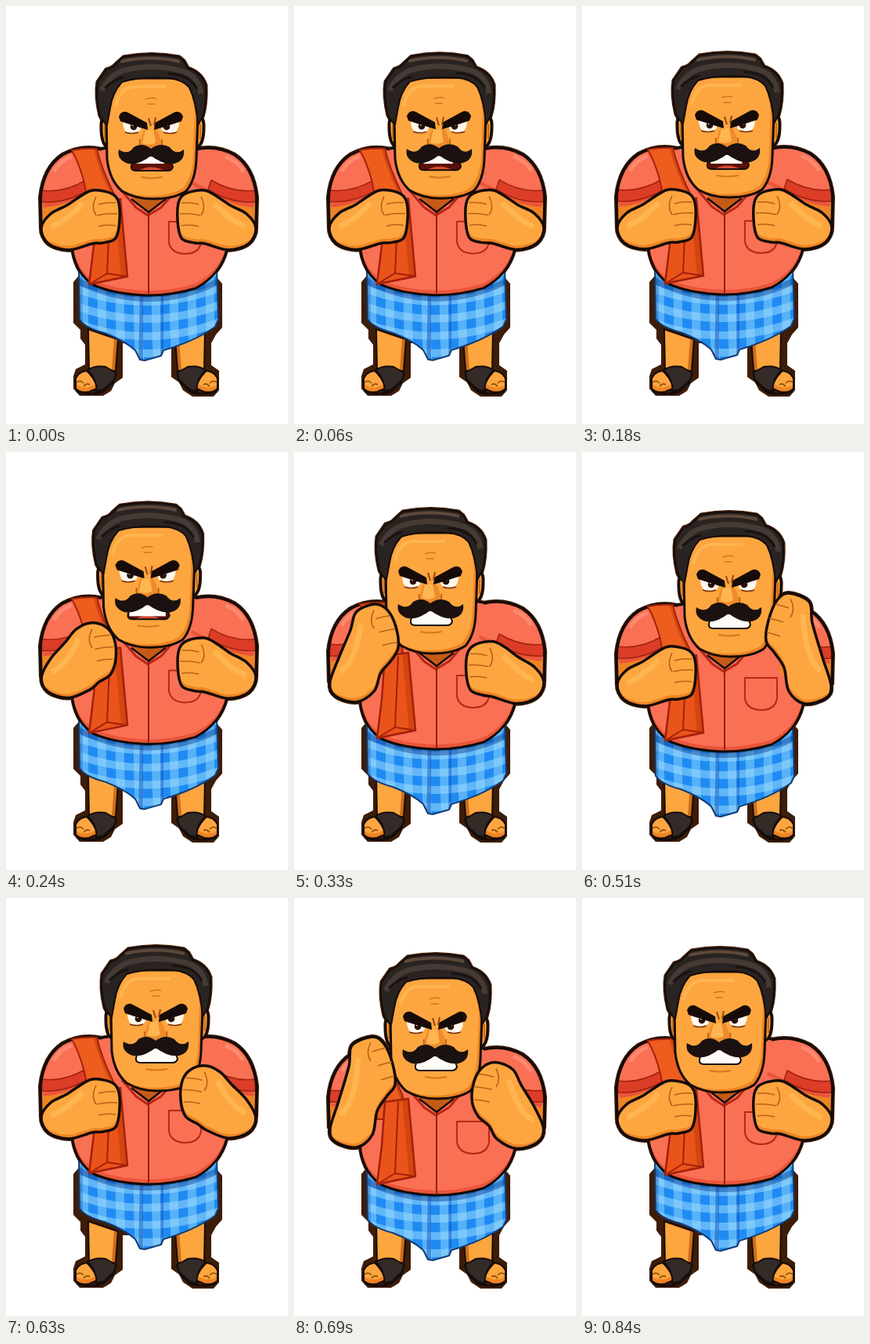
Write an HTML page with a canvas that moves like this. It is 360 by 533 pixels and loops after 900 ms.

```html
<!DOCTYPE html>
<html lang="en">
<head>
<meta charset="utf-8">
<title>Angry man</title>
<style>
html, body { margin: 0; width: 100%; height: 100%; overflow: hidden; background: #fff; }
canvas { display: block; width: 360px; height: 533px; }
</style>
</head>
<body>
<canvas id="stage" width="360" height="533"></canvas>
<script>
const ctx = document.getElementById('stage').getContext('2d');
const LOOP = 900;
const INK = '#160b08', BROWN = '#3d1d08';
const SKIN = '#fda63f', SKIN_DARK = '#ee8424', SKIN_LIGHT = '#ffb550';
const SHIRT = '#fa7054', SHIRT_DARK = '#ea5539', SHIRT_LIGHT = '#ff8a70', RED = '#b92716';

// Times at which the picture changes.
const STEPS = [0, 60, 120, 180, 240, 300, 330, 420, 480, 510, 570, 630, 690, 720, 780, 840];

// time, head x, head y, body y, left fist, right fist, open mouth
const KEYS = [
  [0, 0, 0, 0, 0, 0, 1],
  [180, 0, -2, -1, 0, 0, .8],
  [330, -11, 11, 10, .75, .05, 0],
  [510, 2, 15, 13, 0, 1, 0],
  [630, 6, 0, -4, 0, .25, 0],
  [690, -5, 10, 10, 1, .52, 0],
  [840, -10, 2, -2, 0, 0, 0],
  [900, 0, 0, 0, 0, 0, 1]
];

const P = d => new Path2D(d);
const lerp = (a, b, t) => a + (b - a) * t;

const torso = P('M118 183Q150 177 183 178Q215 177 248 183Q280 192 284 240L282 310Q274 343 242 360Q212 369 182 369Q140 368 112 356Q90 342 85 312L82 240Q85 192 118 183Z');
const sleeve = P('M122 183Q96 177 72 190Q48 206 44 244L48 257Q76 255 102 240L128 228Z');
const shoulder = P('M122 183Q96 177 72 190Q48 206 44 244L45 284');
const upperArm = P('M44 246L112 230V270L45 286Z');
const cuff = P('M45 235Q74 239 102 222L106 234Q77 252 46 250Z');
const skirt = P('M93 335L94 400Q102 411 126 417Q152 427 165 439L171 451L177 452L198 446L201 439Q240 428 267 409L271 400L269 335Z');
const strap = P('M84 184Q100 181 116 182Q122 208 138 240L145 272L106 272Q104 220 84 184Z');
const towel = P('M116 250L112 306L106 355L155 345L146 246Z');
const backing = P('M92 345L86 352V404L95 413V424L101 432V457L89 463L86 472V488L94 497H124L134 491L139 481L149 474V430H211V473L221 480L226 490L238 498H265L272 490V465L262 458V430L268 419L276 410V354L268 345Z');
const face = P('M128 140L129 195Q132 222 148 236Q165 246 187 246Q215 246 230 236Q242 222 243 195L245 140Q240 100 225 92H150Q132 105 128 140Z');
const hair = P('M120 140Q114 115 117 97L128 81Q136 79 140 74L150 65Q186 58 221 65L227 70L232 79Q250 85 255 101Q256 125 251 141L245 152Q243 122 234 104Q226 94 208 92Q170 90 148 97Q136 110 133 130L129 152Q124 148 120 140Z');
const ear = P('M130 142Q121 140 122 156Q122 176 131 181Z');
const brow = P('M146 141Q150 132 158 136L182 149L183 158Q166 153 148 147Z');
const moustache = P('M187 182Q176 173 165 180Q158 191 146 183Q143 196 158 201Q172 203 187 191Q203 203 217 201Q231 197 229 183Q219 191 211 180Q199 173 187 182Z');

const ARM_DOWN = [[45, 283], [54, 303], [80, 311], [110, 303], [124, 302], [140, 296], [145, 273], [143, 248], [132, 238], [111, 235], [96, 242], [78, 254], [57, 265]];
const ARM_UP = [[46, 285], [53, 301], [80, 308], [100, 292], [106, 262], [119, 242], [129, 228], [126, 202], [115, 176], [100, 167], [74, 178], [70, 205], [57, 249]];
const FINGERS_DOWN = [[118, 253, 140, 251], [116, 267, 142, 265], [118, 281, 140, 280]];
const FINGERS_UP = [[100, 186, 117, 181], [107, 204, 125, 199], [111, 222, 128, 217]];

function pose(now) {
  const t = STEPS.filter(s => s <= now).pop();
  const i = KEYS.findIndex(k => k[0] > t);
  const a = KEYS[i - 1], b = KEYS[i];
  const u = (t - a[0]) / (b[0] - a[0]);
  return a.slice(1).map((v, n) => lerp(v, b[n + 1], u));
}

function ink(path, width = 3, color = INK) {
  ctx.lineWidth = width;
  ctx.strokeStyle = color;
  ctx.stroke(path);
}

function fill(path, color) {
  ctx.fillStyle = color;
  ctx.fill(path);
}

// Fills with a shaded lower edge, then outlines.
function solid(path, color, shade, dx = 0, dy = -6, width = 3) {
  ctx.save();
  ctx.clip(path);
  fill(path, shade);
  ctx.translate(dx, dy);
  fill(path, color);
  ctx.restore();
  if (width) ink(path, width);
}

function line(d, width, color = INK) {
  ink(P(d), width, color);
}

function at(x, y, draw) {
  ctx.save();
  ctx.translate(x, y);
  draw();
  ctx.restore();
}

function mirror(axis, draw) {
  ctx.save();
  ctx.translate(axis * 2, 0);
  ctx.scale(-1, 1);
  draw();
  ctx.restore();
}

function both(axis, draw) {
  draw();
  mirror(axis, draw);
}

function closedCurve(pts) {
  const n = pts.length, path = new Path2D();
  const p = i => pts[(i + n) % n];
  path.moveTo(...pts[0]);
  for (let i = 0; i < n; i++) {
    const [a, b, c, d] = [p(i - 1), p(i), p(i + 1), p(i + 2)];
    path.bezierCurveTo(b[0] + (c[0] - a[0]) / 6, b[1] + (c[1] - a[1]) / 6,
      c[0] - (d[0] - b[0]) / 6, c[1] - (d[1] - b[1]) / 6, c[0], c[1]);
  }
  path.closePath();
  return path;
}

function armShape(up) {
  return closedCurve(ARM_DOWN.map((p, i) => p.map((v, n) => lerp(v, ARM_UP[i][n], up))));
}

function drawLeg() {
  solid(P('M105 412L143 425L140 465L106 466Z'), SKIN, '#cf6c18', -5, 0, 2);
  solid(P('M107 465Q93 465 89 475V488Q95 494 106 492L120 486V466Z'), SKIN, SKIN_DARK, 0, -6, 2);
  line('M90 480Q95 476 99 481M99 485Q103 480 107 483', 1.5, '#8d470e');
  solid(P('M103 465Q112 458 127 460L141 468L137 480L124 492L114 494Q120 482 103 465Z'), '#342b29', '#15100f', 0, -4, 2);
  line('M90 491Q104 497 121 493', 2.5);
}

function drawSkirt() {
  ctx.save();
  ctx.clip(skirt);
  fill(skirt, '#1f8bf2');
  for (let i = -1; i < 9; i++) {
    const x = 94 + i * 23;
    line(`M${x + 6} 330Q${x + 4} 390 ${x + 8} 460`, 11, 'rgba(140,214,255,.52)');
  }
  for (let y = 338; y < 465; y += 22) {
    line(`M88 ${y}Q180 ${y + 35} 276 ${y - 2}`, 10, 'rgba(160,222,255,.52)');
  }
  fill(P('M171 360L175 360L175 460L169 460Z'), 'rgba(0,70,180,.45)');
  fill(P('M198 360L201 360L201 452L197 452Z'), 'rgba(0,70,180,.4)');
  fill(P('M90 335L98 335L98 414L90 405Z'), 'rgba(0,70,180,.3)');
  line('M90 350Q182 396 274 350', 8, 'rgba(0,45,130,.4)');
  ctx.restore();
  ink(skirt, 2, '#123c73');
}

function drawTorso() {
  solid(torso, SHIRT, SHIRT_DARK, 0, -6);
  fill(P('M148 232L182 263L217 232Z'), '#c65b16');
  line('M148 236L166 257L181 267L198 257L216 236', 3, RED);
  line('M160 246L182 263L204 246', 2.5);
  line('M182 264V367', 2, '#8f2416');
  line('M208 275H249V301Q247 316 228 316Q210 315 208 301Z', 2, RED);
}

function drawSleeve() {
  fill(upperArm, SKIN_DARK);
  solid(sleeve, SHIRT, SHIRT_DARK, 0, -5, 0);
  line('M61 211Q69 197 84 192', 5, SHIRT_LIGHT);
  fill(cuff, '#dc3d27');
  ink(cuff, 1.5, '#a3230f');
  ink(shoulder, 3.5);
}

function drawTowel() {
  solid(strap, '#ee5c1e', '#d0480f', -4, 0, 0);
  ink(strap, 2, '#a5230a');
  solid(towel, '#ea541a', '#d4450f', -8, 0, 0);
  ink(towel, 2.5, '#a3200c');
  line('M133 250L129 341L106 355M129 341L155 345', 2, '#a3200c');
}

function drawArm(up) {
  const arm = armShape(up);
  solid(arm, SKIN, SKIN_DARK, -1, -5, 3.5);
  ctx.save();
  ctx.clip(arm);
  const y = lerp(266, 250, up);
  line(`M58 ${y + 16}Q78 ${y + 7} ${lerp(98, 82, up)} ${lerp(252, 194, up)}`, 7, SKIN_LIGHT);
  ctx.restore();
  FINGERS_DOWN.forEach((f, i) => {
    const [a, b, c, d] = f.map((v, n) => lerp(v, FINGERS_UP[i][n], up));
    line(`M${a} ${b}Q${(a + c) / 2} ${b - 3} ${c} ${d}`, 1.5, '#b8601a');
  });
  const x = lerp(111, 94, up), k = lerp(247, 178, up);
  line(`M${x + 4} ${k - 4}Q${x - 3} ${k + 10} ${x + 4} ${k + 20}`, 1.5, '#b8601a');
}

function drawEye(inner) {
  fill(P('M151 146L174 153Q175 161 166 162H157Q151 158 151 146Z'), '#fff8ee');
  ctx.beginPath();
  ctx.arc(inner, 154, 4.3, 0, 7);
  ctx.fillStyle = '#281109';
  ctx.fill();
  ctx.fillStyle = '#fff';
  ctx.fillRect(inner - 2, 151, 2, 2);
  line('M154 161Q163 164 171 161', 1.5, '#7b3108');
  fill(brow, INK);
}

function drawMouth(open) {
  const mouth = P('M166 191H210L215 205Q214 210 208 210H168Q161 210 162 204Z');
  fill(mouth, '#5b1009');
  ctx.save();
  ctx.clip(mouth);
  fill(P('M166 213Q187 198 210 213Z'), '#d64a32');
  ctx.fillStyle = '#fffdf8';
  ctx.fillRect(lerp(160, 168, open), 188, lerp(56, 36, open), lerp(23, 13, open));
  ctx.restore();
  ink(mouth, 2);
  line('M174 218Q187 221 202 218', 2, '#d9771f');
}

function drawFeatures(open) {
  line('M180 119Q187 116 194 118M182 125H192', 1.5, '#d5741f');
  drawEye(165);
  mirror(187, () => drawEye(167));
  line('M184 143L187 153M193 142L191 152', 2, '#9a470d');
  fill(P('M178 158H195L202 176Q199 184 187 184Q174 183 172 176Z'), '#f08b2b');
  fill(P('M180 158H190L193 174Q187 179 176 175Z'), SKIN_LIGHT);
  line('M173 170Q171 181 180 182M201 170Q203 181 194 182', 1.5, '#b05a14');
  drawMouth(open);
  fill(moustache, '#1a1110');
}

function drawHead(open) {
  both(187, () => {
    solid(ear, SKIN, SKIN_DARK, -3, 0, 3);
    line('M126 151V170', 1.5, '#b95612');
  });
  solid(face, SKIN, SKIN_DARK, -4, -4);
  line('M140 128Q145 105 162 103H204', 4, SKIN_LIGHT);
  fill(hair, '#292321');
  ctx.save();
  ctx.clip(hair);
  line('M122 108Q132 88 151 82Q190 72 228 84Q246 91 249 112', 7, '#453a34');
  line('M146 71Q185 62 222 71', 4, '#5d493a');
  line('M126 105Q137 94 150 91M206 86Q235 87 244 106', 3, '#171312');
  ctx.restore();
  ink(hair, 2);
  at(-2, 0, () => drawFeatures(open));
}

function draw(now) {
  const [hx, hy, dy, left, right, open] = pose(now);
  ctx.fillStyle = '#fff';
  ctx.fillRect(0, 0, 360, 533);
  ctx.lineJoin = 'round';

  fill(backing, BROWN);
  at(0, dy, () => {
    const halo = up => {
      ink(shoulder, 6, BROWN);
      ink(armShape(up), 6, BROWN);
    };
    ink(torso, 5, BROWN);
    halo(left);
    mirror(182, () => halo(right));
  });
  at(hx, hy, () => {
    ink(hair, 5, BROWN);
    both(187, () => ink(ear, 5, BROWN));
  });

  both(179.5, drawLeg);
  at(0, dy, () => {
    drawSkirt();
    drawTorso();
    both(182, drawSleeve);
    drawTowel();
  });
  at(hx, hy, () => drawHead(open));
  at(0, dy, () => {
    drawArm(left);
    mirror(182, () => drawArm(right));
  });
}

function tick() {
  draw(performance.now() % LOOP);
  requestAnimationFrame(tick);
}
tick();
</script>
</body>
</html>
```
